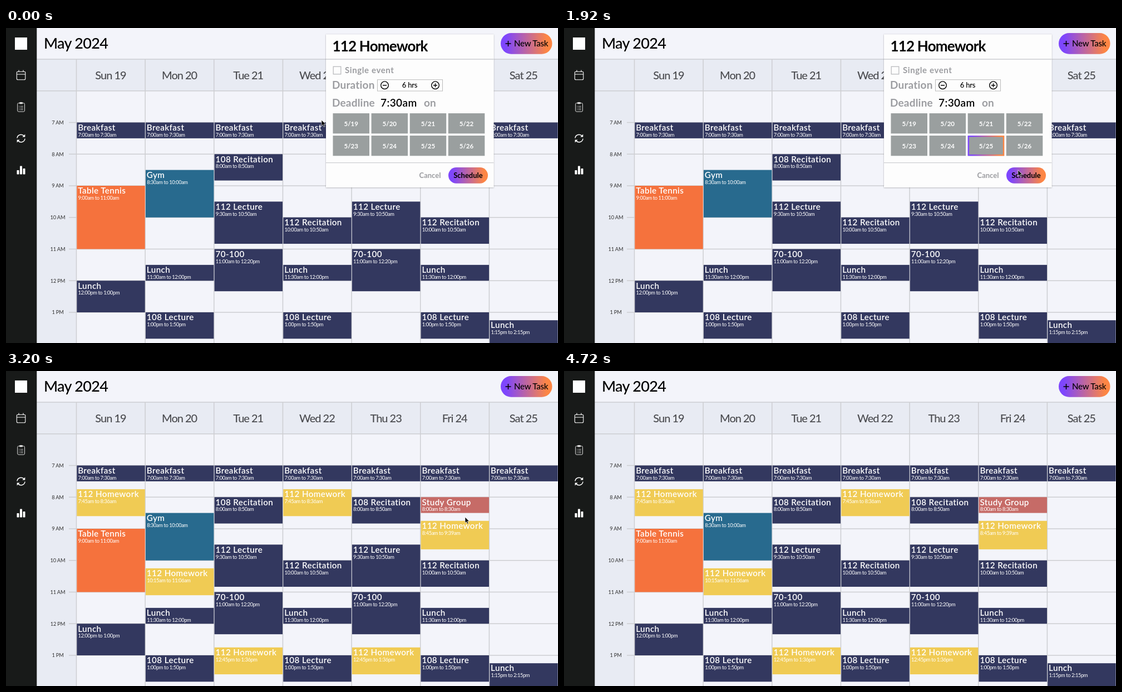
An HTML page that plays this animation: 992x565 px, repeating every 4800 ms.

```html
<!DOCTYPE html>
<html lang="en">
<head>
<meta charset="utf-8">
<title>Week planner</title>
<style>
  html, body { margin: 0; width: 100%; height: 100%; overflow: hidden; }
  svg { display: block; width: 992px; height: 565px; font-family: Lato, sans-serif; }
  text { white-space: pre; }
  .month { font-size: 27px; font-weight: 500; letter-spacing: -.7px; }
  .day { font-size: 20px; font-weight: 500; letter-spacing: -1px; fill: #4b4c50; }
  .hour { font-size: 9.3px; letter-spacing: -.2px; fill: #333; }
  .name { font-size: 15.2px; font-weight: 600; letter-spacing: .4px; fill: #fff; }
  .time { font-size: 9.3px; letter-spacing: -.4px; fill: #fff; }
  .task { font-size: 15px; font-weight: 500; letter-spacing: -.2px; }
  .title { font-size: 26px; font-weight: 700; letter-spacing: -.8px; }
  .check { font-size: 15px; font-weight: 700; letter-spacing: .6px; fill: #9c9da1; }
  .label { font-size: 19px; font-weight: 700; letter-spacing: .2px; fill: #9c9da1; }
  .value { font-size: 19px; font-weight: 600; letter-spacing: .4px; }
  .count { font-size: 13px; font-weight: 500; letter-spacing: -.2px; }
  .date { font-size: 11.5px; font-weight: 700; fill: #fff; }
  .cancel { font-size: 13px; font-weight: 700; fill: #9c9da1; }
  .go { font-size: 13px; font-weight: 700; }
  .mid { text-anchor: middle; }
</style>
</head>
<body>
<svg viewBox="0 0 992 565">
  <defs>
    <linearGradient id="glow">
      <stop offset=".1" stop-color="#7e46fd"/>
      <stop offset=".9" stop-color="#fd8644"/>
    </linearGradient>
    <filter id="shadow" x="-10%" y="-10%" width="120%" height="120%">
      <feDropShadow dx="0" dy=".5" stdDeviation="1.2" flood-opacity=".35"/>
    </filter>
  </defs>
  <g id="page"></g>
  <g id="homework"></g>
  <g id="dialog"></g>
  <path id="cursor" d="M0 0V10.500L2.400 8.400 4.200 12.300 6 11.500 4.300 7.700H7.600Z" stroke="#fff" stroke-width=".7"/>
</svg>
<script>
const NAVY = '#33385f', LINE = '#cdced2', YELLOW = '#f0cb54';
const COL = 123.65, HOUR = 56.75;
const $ = id => document.getElementById(id);
const colX = day => 126.5 + COL * day;
const hourY = hour => 169.5 + HOUR * (hour - 7);

const rect = (x, y, w, h, fill, extra = '') =>
  `<rect x="${x}" y="${y}" width="${w}" height="${h}" fill="${fill}" ${extra}/>`;
const text = (x, y, cls, str) => `<text x="${x}" y="${y}" class="${cls}">${str}</text>`;
const path = (d, stroke, width = 1.3, fill = 'none') =>
  `<path d="${d}" stroke="${stroke}" stroke-width="${width}" fill="${fill}"/>`;

function clock(hour) {
  const minutes = String(Math.round(hour % 1 * 60)).padStart(2, '0');
  return `${(Math.floor(hour) + 11) % 12 + 1}:${minutes}${hour < 12 ? 'am' : 'pm'}`;
}

function event(name, day, start, end, fill = NAVY) {
  const x = colX(day), y = hourY(start);
  return rect(x + .8, y, COL - 1.2, (end - start) * HOUR, fill) +
    text(x + 2.7, y + 14.3, 'name', name) +
    text(x + 3, y + 25.2, 'time', `${clock(start)} to ${clock(end)}`);
}
const repeat = (days, name, ...rest) => days.map(day => event(name, day, ...rest)).join('');

function grid() {
  let out = rect(0, 0, 992, 565, '#f3f4fa') +
    rect(55, 56, 937, 57, '#e8ebf3') + rect(55, 113, 72, 452, '#e8ebf3') +
    path('M55 56H992M55 112.700H992', LINE, 1.5);
  for (let hour = 7; hour < 14; hour++) {
    out += path(`M113 ${hourY(hour)}H992`, LINE) +
      text(93, hourY(hour) + 3.3, 'hour mid', `${(hour + 11) % 12 + 1} ${hour < 12 ? 'AM' : 'PM'}`);
  }
  ['Sun', 'Mon', 'Tue', 'Wed', 'Thu', 'Fri', 'Sat'].forEach((name, day) => {
    out += path(`M${colX(day)} 56V565`, LINE, 1.5) +
      text(colX(day) + 61.5, 91.7, 'day mid', `${name} ${19 + day}`);
  });
  return out;
}

function sidebar() {
  const white = '#fff';
  return rect(0, 0, 55.3, 565, '#181a19') + rect(16, 17, 22, 22, white) +
    rect(19.3, 78.3, 15.5, 14.5, 'none', 'rx="2" stroke="#fff" stroke-width="1.1"') +
    path('M19 83H35M23 75.500V79M31 75.500V79', white, 1.1) +
    rect(20.7, 134.7, 12.8, 15.3, 'none', 'rx="2" stroke="#ddd"') +
    rect(24, 133, 6, 3.2, '#ddd', 'rx="1"') +
    path('M23 140.500h1.300M25.500 140.500h5.500M23 143.500h1.300M25.500 143.500h5.500M23 146.500h1.300M25.500 146.500h5.500', '#ccc', .9) +
    path('M20 197.500A7 7 0 0 1 32.500 194M34 198.500A7 7 0 0 1 21.500 202', white, 1.5) +
    path('M34.300 190.500V195.500H29.300ZM19.700 205.500V200.500H24.700Z', 'none', 0, white) +
    rect(19.5, 255, 4, 7.5, white, 'rx=".7"') + rect(25, 247.5, 4, 15, white, 'rx=".7"') +
    rect(30.5, 252, 4, 10.5, white, 'rx=".7"');
}

function dialog() {
  const grey = '#9a9f9f';
  let out = rect(575, 11.5, 301.5, 274.5, '#fdfdfd', 'filter="url(#shadow)"') +
    path('M575 56H876.500M575 241.700H876.500', LINE, 1.3) +
    text(586.5, 42, 'title', '112 Homework') +
    rect(588.2, 69.2, 13.6, 13.6, 'none', 'stroke="#b5b6b9" stroke-width="1.2"') +
    text(609, 81, 'check', 'Single event') + text(586, 109, 'label', 'Duration') +
    rect(667.5, 92.7, 117, 20.3, 'none', 'stroke="#bbb"') +
    '<g fill="none" stroke="#000" stroke-width="1.4"><circle cx="680.5" cy="102.7" r="6.8"/>' +
    '<circle cx="771.5" cy="102.7" r="6.8"/><path d="M677 102.700h7M768 102.700h7M771.500 99.200v7"/></g>' +
    text(725.5, 107.2, 'count mid', '6 hrs') + text(586, 141, 'label', 'Deadline') +
    text(673, 141, 'value', '7:30am') + text(751, 141, 'label', 'on');
  for (let i = 0; i < 8; i++) {
    const x = 587.5 + i % 4 * 69.1, y = i < 4 ? 153 : 193;
    out += rect(x, y, 65.5, 36.3, grey);
    if (i == 6) out += rect(x + 1.2, y + 1.2, 63.1, 33.9, 'none', 'id="picked" stroke="url(#glow)" stroke-width="2.4"');
    out += text(x + 32.7, y + 22.5, 'date mid', `5/${19 + i}`);
  }
  return out + text(762, 269, 'cancel mid', 'Cancel') +
    rect(795, 250, 71, 28.7, 'url(#glow)', 'rx="14.3"') + text(830.5, 269, 'go mid', 'Schedule');
}

$('page').innerHTML = grid() + sidebar() + text(68, 37, 'month', 'May 2024') +
  rect(889, 9, 92.5, 37.7, 'url(#glow)', 'rx="18.8"') +
  path('M897.500 28h10M902.500 23v10', '#000', 1.6) + text(913, 33, 'task', 'New Task') +
  repeat([0, 1, 2, 3, 4, 5, 6], 'Breakfast', 7, 7.5) +
  repeat([2, 4], '108 Recitation', 8, 8 + 5 / 6) +
  repeat([2, 4], '112 Lecture', 9.5, 10 + 5 / 6) +
  repeat([3, 5], '112 Recitation', 10, 10 + 5 / 6) +
  repeat([2, 4], '70-100', 11, 12 + 1 / 3) +
  repeat([1, 3, 5], 'Lunch', 11.5, 12) +
  repeat([1, 3, 5], '108 Lecture', 13, 13 + 5 / 6) +
  event('Lunch', 0, 12, 13) + event('Lunch', 6, 13.25, 14.25) +
  event('Table Tennis', 0, 9, 11, '#f5723d') + event('Gym', 1, 8.5, 10, '#286a8e') +
  event('Study Group', 5, 8, 8.5, '#c66b67');
$('homework').innerHTML = repeat([0, 3], '112 Homework', 7.75, 8.6, YELLOW) +
  event('112 Homework', 1, 10.25, 11.1, YELLOW) + event('112 Homework', 5, 8.75, 9.65, YELLOW) +
  repeat([2, 4], '112 Homework', 12.75, 13.6, YELLOW);
$('dialog').innerHTML = dialog();

const show = (id, on) => $(id).setAttribute('visibility', on ? 'visible' : 'hidden');
const ease = p => p * p * (3 - 2 * p);

// Pointer stops: time, x, y
const stops = [[0, 567, 165], [960, 767, 216], [1440, 767, 216], [2080, 825, 262], [4800, 825, 262]];
function pointer(t) {
  const i = stops.findIndex(stop => stop[0] > t);
  const [t0, x0, y0] = stops[i - 1], [t1, x1, y1] = stops[i];
  const p = ease((t - t0) / (t1 - t0));
  return [x0 + (x1 - x0) * p, y0 + (y1 - y0) * p];
}

function draw() {
  const t = Math.floor(performance.now() % 4800 / 80) * 80;
  const scheduled = t >= 2720;
  show('homework', scheduled);
  show('dialog', !scheduled);
  show('picked', !scheduled && t >= 1440);
  show('cursor', t < 4240);
  $('cursor').setAttribute('transform', `translate(${pointer(t)})`);
  requestAnimationFrame(draw);
}
draw();
</script>
</body>
</html>
```
